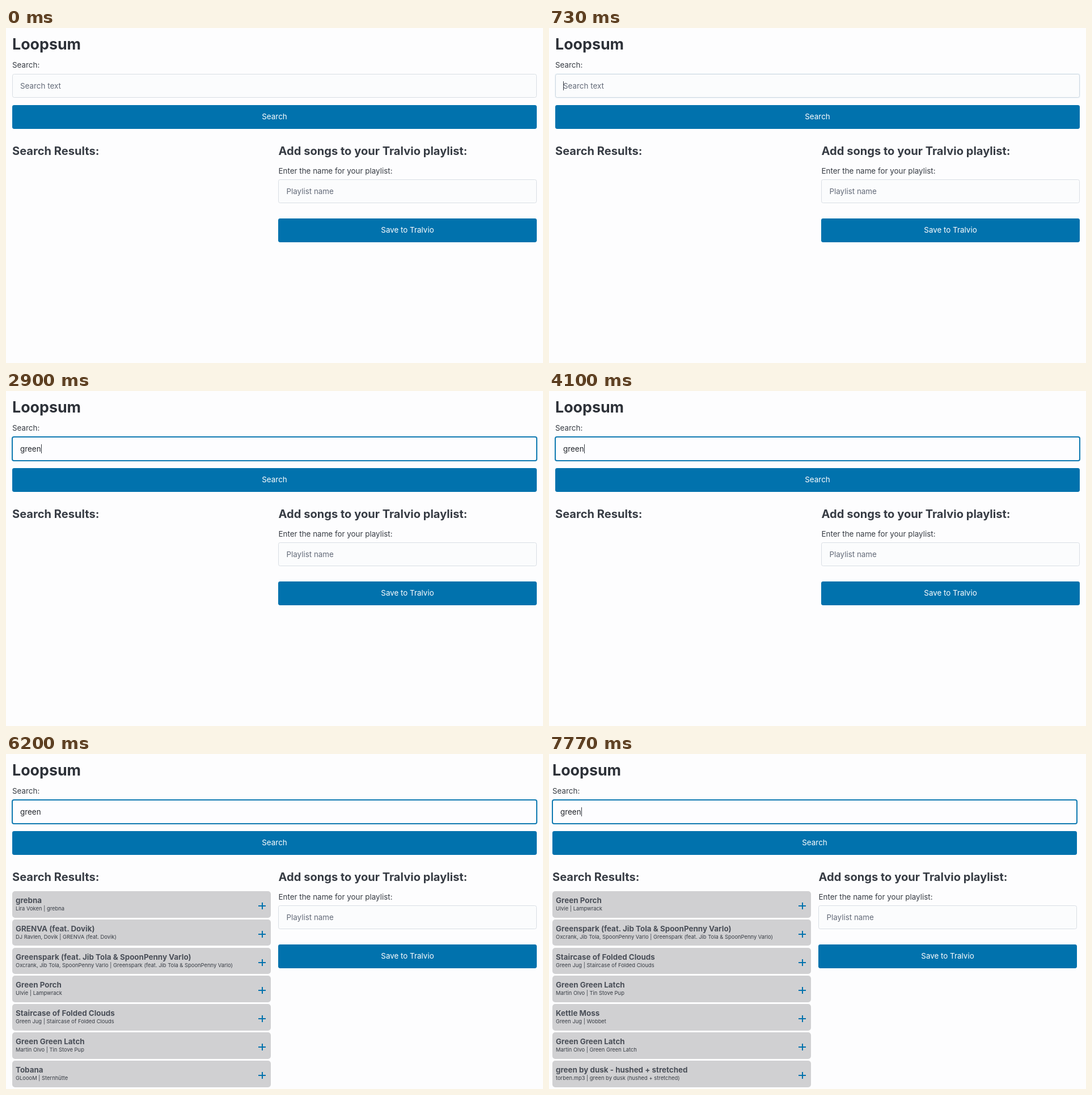
Write an HTML page that moves like this. It is 947 px wide and 591 px high and loops after 8 s.

```html
<!DOCTYPE html>
<html lang="en">
<head>
<meta charset="utf-8">
<title>Playlist search</title>
<style>
  html, body { margin: 0; width: 100%; height: 100%; overflow: hidden; background: #fdfdfe; }
  #page {
    position: absolute; left: 0; top: 0; width: 947px; height: 591px; overflow: hidden;
    font: 13.4px/20px Inter, sans-serif; font-optical-sizing: none; color: #373c44;
  }
  #page div { position: absolute; box-sizing: border-box; white-space: pre; }
  #page .h1 { font-size: 26.8px; font-weight: 700; color: #2d3138; }
  #page .h2 { font-size: 20.1px; font-weight: 700; color: #373c44; }
  #page .title { font-weight: 700; color: #4a4f58; }
  #page .sub { font-size: 9.4px; }
  #page .hint { color: #646b79; }
  #page .typed { color: #23262c; }
  #page .field { border: 1px solid #d9dee4; border-radius: 3.4px; background: #fbfcfd; }
  #page .ring { border: 2px solid #0e79b1; border-radius: 4px; background: #fdfdff; }
  #page .button {
    border-radius: 3.4px; background: #0172ad; color: #fff; text-align: center; line-height: 41px;
  }
  #page .card { border-radius: 5px; background: #d0d0d2; }
  #page .plus { background: #0172ad; }
  #page .caret { width: 1px; height: 16px; background: #373c44; }
</style>
</head>
<body>
<div id="page"></div>
<script>
const LOOP = 8000;
const BLINK = 600;
const FOCUS = 700, FOCUS_END = 930;
const KEYS = [2030, 2300, 2470, 2630, 2900];
const QUERY = "green";
const FIRST_RESULTS = 6200, NEXT_RESULTS = 6300;
const CARD_TOP = 242, CARD_STEP = 49.83;

const latch = "Green Green Latch";
const spark = "Greenspark (feat. Jib Tola & SpoonPenny Varlo)";
const stairs = "Staircase of Folded Clouds";
const porchSong = ["Green Porch", "Ulvie | Lampwrack"];
const sparkSong = [spark, "Oxcrank, Jib Tola, SpoonPenny Varlo | " + spark];
const stairsSong = [stairs, "Green Jug | " + stairs];
const latchSong = [latch, "Martin Olvo | Tin Stove Pup"];

const firstSongs = [
  ["grebna", "Lira Voken | grebna"],
  ["GRENVA (feat. Dovik)", "DJ Ravlen, Dovik | GRENVA (feat. Dovik)"],
  sparkSong, porchSong, stairsSong, latchSong,
  ["Tobana", "GLoooM | Sternhütte"],
];
const nextSongs = [
  porchSong, sparkSong, stairsSong, latchSong,
  ["Kettle Moss", "Green Jug | Wobbet"],
  [latch, "Martin Olvo | " + latch],
  ["green by dusk - hushed + stretched", "torben.mp3 | green by dusk (hushed + stretched)"],
];

const page = document.getElementById("page");

function add(parent, cls, x, y, w, h, text = "") {
  const el = document.createElement("div");
  el.className = cls;
  el.style.left = x + "px";
  el.style.top = y + "px";
  if (w) el.style.width = w + "px";
  if (h) el.style.height = h + "px";
  el.textContent = text;
  parent.append(el);
  return el;
}

// A line of text whose capitals are centred on y
function label(parent, cls, x, y, text) {
  return add(parent, cls, x, y - 10, 0, 20, text);
}

function buildList(songs) {
  const list = add(page, "list", 0, 0, 947, 591);
  songs.forEach(([title, sub], i) => {
    const y = CARD_TOP + i * CARD_STEP;
    add(list, "card", 11, y, 456, 46.6);
    label(list, "title", 17, y + 16, title);
    label(list, "sub", 17, y + 31, sub);
    const py = Math.round(y + 26);
    add(list, "plus", 445, py - 1, 13, 2);
    add(list, "plus", 451, py - 6, 2, 12);
  });
  return list;
}

label(page, "h1", 11, 27.5, "Loopsum");
label(page, "", 11, 65, "Search:");
add(page, "field", 11, 81, 925, 42);
const ring = add(page, "ring", 10, 80, 927, 44);
const hint = label(page, "hint", 25, 102, "Search text");
const typed = label(page, "typed", 25, 102, "");
const caret = add(page, "caret", 25, 94);
add(page, "button", 11, 136, 925, 42, "Search");
label(page, "h2", 11, 217, "Search Results:");
label(page, "h2", 480.5, 217, "Add songs to your Tralvio playlist:");
label(page, "", 480.5, 252, "Enter the name for your playlist:");
add(page, "field", 480, 267, 456, 42);
label(page, "hint", 494.5, 288, "Playlist name");
add(page, "button", 480, 336, 456, 42, "Save to Tralvio");
const firstList = buildList(firstSongs);
const nextList = buildList(nextSongs);

const show = (el, on) => { el.style.visibility = on ? "visible" : "hidden"; };

function caretOn(t) {
  if (t < FOCUS) return false;
  const start = t < KEYS[0] ? FOCUS : KEYS.filter(k => k <= t).pop();
  return Math.floor((t - start) / BLINK) % 2 === 0;
}

function draw(t) {
  const p = Math.min(1, Math.max(0, (t - FOCUS) / (FOCUS_END - FOCUS)));
  ring.style.opacity = p * p * (3 - 2 * p);

  const text = QUERY.slice(0, KEYS.filter(k => k <= t).length);
  if (typed.textContent !== text) typed.textContent = text;
  show(hint, !text);
  show(caret, caretOn(t));
  caret.style.left = 25 + typed.getBoundingClientRect().width + "px";

  show(firstList, t >= FIRST_RESULTS && t < NEXT_RESULTS);
  show(nextList, t >= NEXT_RESULTS);
  // The scrollbar narrows the page and recentres it
  page.style.left = t >= NEXT_RESULTS ? "-5px" : "0";
}

const begin = performance.now();
function tick() {
  draw((performance.now() - begin) % LOOP);
  requestAnimationFrame(tick);
}
tick();
</script>
</body>
</html>
```
